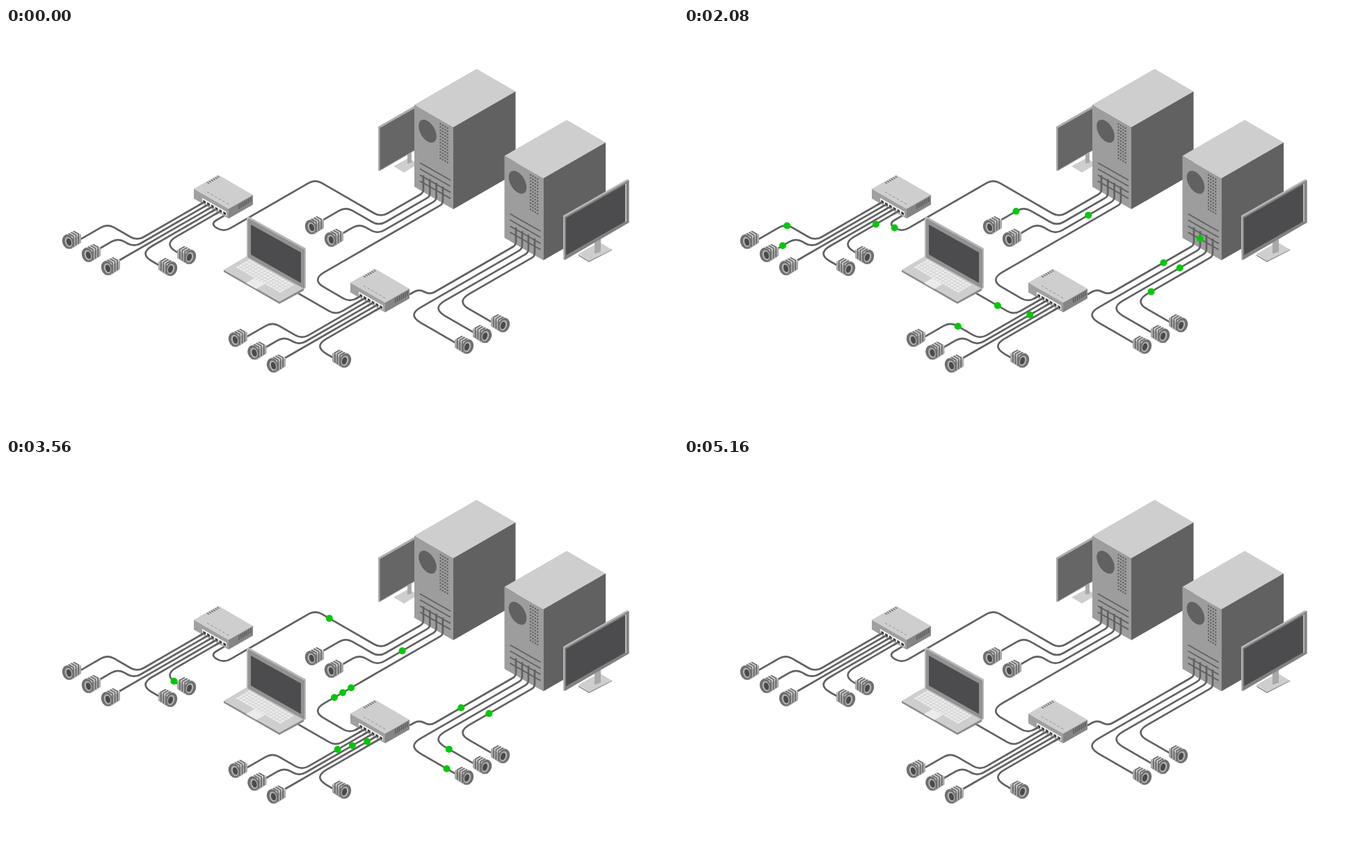
Recreate the animation shown at these times as an HTML page. Size 966 by 580 pixels, loop 5200 ms.

```html
<!DOCTYPE html>
<html lang="en">
<head>
<meta charset="utf-8">
<title>Network traffic</title>
<style>
html, body { margin: 0; width: 100%; height: 100%; overflow: hidden; background: #fff; }
svg { display: block; width: 966px; height: 580px; }
</style>
</head>
<body>
<svg id="stage" viewBox="0 0 966 580"></svg>
<script>
const LOOP = 5200, STEP = 40;
const SLOPE = Math.tan(Math.PI / 6);
const LIGHT = '#cecece', MID = '#9d9d9d', DARK = '#616161', SCREEN = '#4c4c4e', GREEN = '#00c806';

const stage = document.getElementById('stage');
const range = (n, f) => Array.from({ length: n }, (_, i) => f(i)).join('');
const poly = (fill, points) => `<polygon fill="${fill}" points="${points}"/>`;
const line = (d, width = 1.8, color = DARK) => `<path d="${d}" fill="none" stroke="${color}" stroke-width="${width}"/>`;
const oval = (fill, x, y, rx, ry) => `<ellipse cx="${x}" cy="${y}" rx="${rx}" ry="${ry}" fill="${fill}" transform="rotate(-18 ${x} ${y})"/>`;
const at = (x, y, body, extra = '') => `<g transform="translate(${x} ${y}) ${extra}">${body}</g>`;

// Isometric box: left corner of the lid, its two sides' widths, and height
function box(x, y, front, side, h, frontFill, sideFill) {
  const f = front * SLOPE, s = side * SLOPE, right = x + front + side;
  return poly(LIGHT, `${x},${y} ${x + side},${y - s} ${right},${y - s + f} ${x + front},${y + f}`) +
    poly(frontFill, `${x},${y} ${x + front},${y + f} ${x + front},${y + f + h} ${x},${y + h}`) +
    poly(sideFill, `${x + front},${y + f} ${right},${y - s + f} ${right},${y - s + f + h} ${x + front},${y + f + h}`);
}

const server =
  box(587, 110.5, 56, 89.5, 118, MID, DARK) +
  `<circle r="14.8" transform="matrix(.866 .5 0 1 606 148.5)" fill="${DARK}"/>` +
  range(48, i => {
    const col = i % 4, row = i >> 2;
    return `<circle cx="${624.5 + col * 3.4}" cy="${138 + col * 2 + row * 4.5}" r="1.2" fill="${DARK}"/>`;
  }) +
  range(4, i => line(`M595 ${194 + i * 8.8}l44 25`));

const backMonitor =
  poly(LIGHT, '557,199 579,187 592,196 572,208') +
  poly('#a8a8a8', '577,178 583,175 583,194 577,195') +
  poly('#adadad', '535,142 589,111 592,113 592,174 537,206 535,205') +
  poly('#666', '537.5,144 592,113 592,173 537.5,204.5');

const frontMonitor =
  poly('#929292', '823,326 838,335 871,318 871,320 838,337 823,328') +
  poly(LIGHT, '823,325 853,308 871,319 838,335') +
  poly('#a8a8a8', '846,306 855,301 855,322 846,325') +
  poly('#b7b7b7', '801,270 893,217.5 895.5,219 895.5,280 803,334 801,333') +
  poly('#818181', '803,272 895.5,219 895.5,280 803,334') +
  poly(SCREEN, '805,273.5 890,225 890,278.5 805,327') +
  line('M891 224V279', 1.2, '#ddd');

const laptop =
  poly('#8b8b8b', '313,348 394,393 428,374 428,378 393,397 313,351') +
  poly(LIGHT, '313,348 347,328 428,374 393,394') +
  range(75, i => {
    const u = i % 15, v = i / 15 | 0;
    return at(350 + u * 4.3 - v * 4.1, 333 + u * 2.48 + v * 2.35, '<path d="M0 0l3.5 2-3.2 1.9-3.5-2z" fill="#ececec"/>');
  }) +
  poly('#ebebeb', '345,367 357,360 372,368.5 360,375.5') +
  poly('#b8b8b8', '346,273 349,271.5 431,317 431,374 428,376 346,330') +
  poly('#929292', '348,274 429,319 429,375 348,330') +
  poly(SCREEN, '352,283 424,323 424,367 352,326');

const hubPort = i => [285 + i * 5.8, 250.5 + i * 3.3];
const hub =
  box(270, 231.5, 50, 35, 14, '#a0a0a0', '#858585') +
  range(6, i => line(`M${289 + i * 2.9} ${222 - i * 1.7}l3 1.7`, 1.3)) +
  range(6, i => line(`M${289 + i * 5.6} ${236 + i * 3.2}l3 1.7`, 1, '#8f8f8f')) +
  range(7, i => line(`M${335 + i * 2.8} ${253.5 - i * 1.65}v7`, 1.3, '#555')) +
  range(6, i => at(...hubPort(i),
    poly('#f4f4f4', '-3,-6 3,-2.6 3,3.6 -3,.2') + poly('#333', '-1.6,-3 2,-1 2,2.6 -1.6,.6')));
const stubs = n => range(n, i => line(`M${hubPort(i)}l-8 4.6`, 2.6));

const camera =
  poly('#a9a9a9', '-9,-7 3,-13 14,-8 14,4 0,13 -8,12') +
  poly(LIGHT, '-9,-7 3,-13 14,-8 3,-2') +
  range(3, i => line(`M${-4 + i * 3.6} ${-9 - i * 1.8}l7 4V${10 - i * 2.2}`, 1.5)) +
  oval('#6f6f6f', -5, 2.5, 8, 10.5) + oval('#b5b5b5', -4, 3, 5, 7.5) + oval('#4a4a4a', -3.5, 3, 3.4, 5.5);
const cameras = (n, x, y, dx, dy, flip) =>
  range(n, i => at(x + i * dx, y + i * dy, camera, flip ? 'scale(-1 1)' : ''));

stage.innerHTML =
  backMonitor + server + at(129.5, 73.5, server) + frontMonitor +
  '<g id="cables"></g><g id="dots"></g>' +
  hub + stubs(5) + at(225, 135, hub + stubs(6)) +
  cameras(3, 94, 305, 28, 19) + cameras(2, 443, 284, 28, 18) + cameras(3, 333, 446, 27.5, 18.5) +
  cameras(2, 233, 344, 27, -17, true) + cameras(3, 659, 456, 26, -15.5, true) + cameras(1, 483, 476, 0, 0, true) +
  laptop;

const cables = document.getElementById('cables');
const dots = document.getElementById('dots');
const add = (parent, tag, attrs) => {
  const el = document.createElementNS('http://www.w3.org/2000/svg', tag);
  for (const k in attrs) el.setAttribute(k, attrs[k]);
  return parent.appendChild(el);
};

// A cable drops from its port, then its legs alternate between the two
// isometric directions; only the x of each turn is needed.
function cable([x, y], drop, ...turns) {
  const p = drop ? [[x, y], [x, y + drop]] : [[x, y]];
  y += drop;
  turns.forEach((nx, i) => {
    y += (i % 2 ? SLOPE : -SLOPE) * (nx - x);
    p.push([x = nx, y]);
  });
  let d = `M${p[0]}`;
  for (let i = 1; i < p.length - 1; i++) {
    const [cx, cy] = p[i], a = p[i - 1], b = p[i + 1];
    const la = Math.hypot(a[0] - cx, a[1] - cy), lb = Math.hypot(b[0] - cx, b[1] - cy);
    const sharp = (cx - a[0]) * (b[0] - cx) < 0;
    const most = drop && i === 1 ? 5 : sharp ? 22 : 11;
    const r = Math.min(most, la / 2, lb * (i === p.length - 2 ? .9 : .5));
    const toward = (q, l) => [cx + (q[0] - cx) * r / l, cy + (q[1] - cy) * r / l];
    d += `L${toward(a, la)}Q${cx},${cy} ${toward(b, lb)}`;
  }
  d += `L${p[p.length - 1]}`;
  return add(cables, 'path', { d, fill: 'none', stroke: DARK, 'stroke-width': 2.7 });
}

// Dots leave at the given times, in px per ms; a negative speed runs towards the port
const runs = [];
function send(path, speed, ...starts) {
  const length = path.getTotalLength();
  for (const start of starts) {
    runs.push({ path, length, speed, start, dot: add(dots, 'circle', { r: 5, fill: GREEN }) });
  }
}

// Left hub and its cameras
const left = (i, ...turns) => cable(hubPort(i), 0, ...turns);
send(left(0, 188.5, 146, 107), -.215, 1115, 1865, 2455);
send(left(1, 184, 161, 134), -.205, 990, 2036, 2668);
left(2, 163);
const fourth = left(3, 191, 222), fifth = left(4, 226, 248);
send(fourth, -.125, 80, 3920);
send(fourth, .125, 2312);
send(fifth, -.11, 3490);
send(fifth, .11, 1740);

// Upper server
const upper = (i, ...turns) => cable([600 + i * 9.3, 212 + i * 5.4], 25, ...turns);
const uplink = upper(0, 539, 444.5, 313, 293, 314);
const relays = [uplink, upper(1, 536, 488.5, 456), upper(2, 534, 508, 484)];
relays.forEach((path, i) => {
  send(path, .195, [225, 1195, 1735][i]);
  send(path, -.195, [2475, 2465, 3073][i]);
});
const trunk = upper(3, 438.7, 494.4, 510);
for (let i = 0; i < 3; i++) send(trunk, .16, 2284 + i * 87);

// Right hub, laptop and cameras
const right = (i, ...turns) => cable([hubPort(i)[0] + 225, hubPort(i)[1] + 135], 0, ...turns);
send(right(1, 474, 418), -.15, 467, 1147, 1827);
[right(2, 425.5, 383, 346), right(3, 421.5, 400, 373), right(4, 401)].forEach((path, i) =>
  send(path, .155, 1140 + i * 715, 3225 + i * 115));
right(5, 441.8, 471);

// Lower server
const lower = (i, ...turns) => cable([733 + i * 9, 287 + i * 5.3], 25.5, ...turns);
const link = lower(0, 609, 594, 580);
send(link, -.145, 480, 1230);
send(link, .15, 2790);
for (let i = 0; i < 3; i++) {
  const path = lower(i + 1, 577 + i * 35, 648 + i * 25.5);
  send(path, -.23, 895 + i * 430);
  send(path, i < 2 ? .23 : .15, 2400 + i * 200 + (i && 90));
}

function draw(now) {
  const t = Math.floor(now % LOOP / STEP) * STEP;
  for (const { path, length, speed, start, dot } of runs) {
    const gone = (t - start) * Math.abs(speed);
    const visible = gone >= 0 && gone <= length;
    dot.style.display = visible ? '' : 'none';
    if (!visible) continue;
    const { x, y } = path.getPointAtLength(speed > 0 ? gone : length - gone);
    dot.setAttribute('cx', x);
    dot.setAttribute('cy', y);
  }
}

const start = performance.now();
function tick() {
  draw(performance.now() - start);
  requestAnimationFrame(tick);
}
tick();
</script>
</body>
</html>
```
